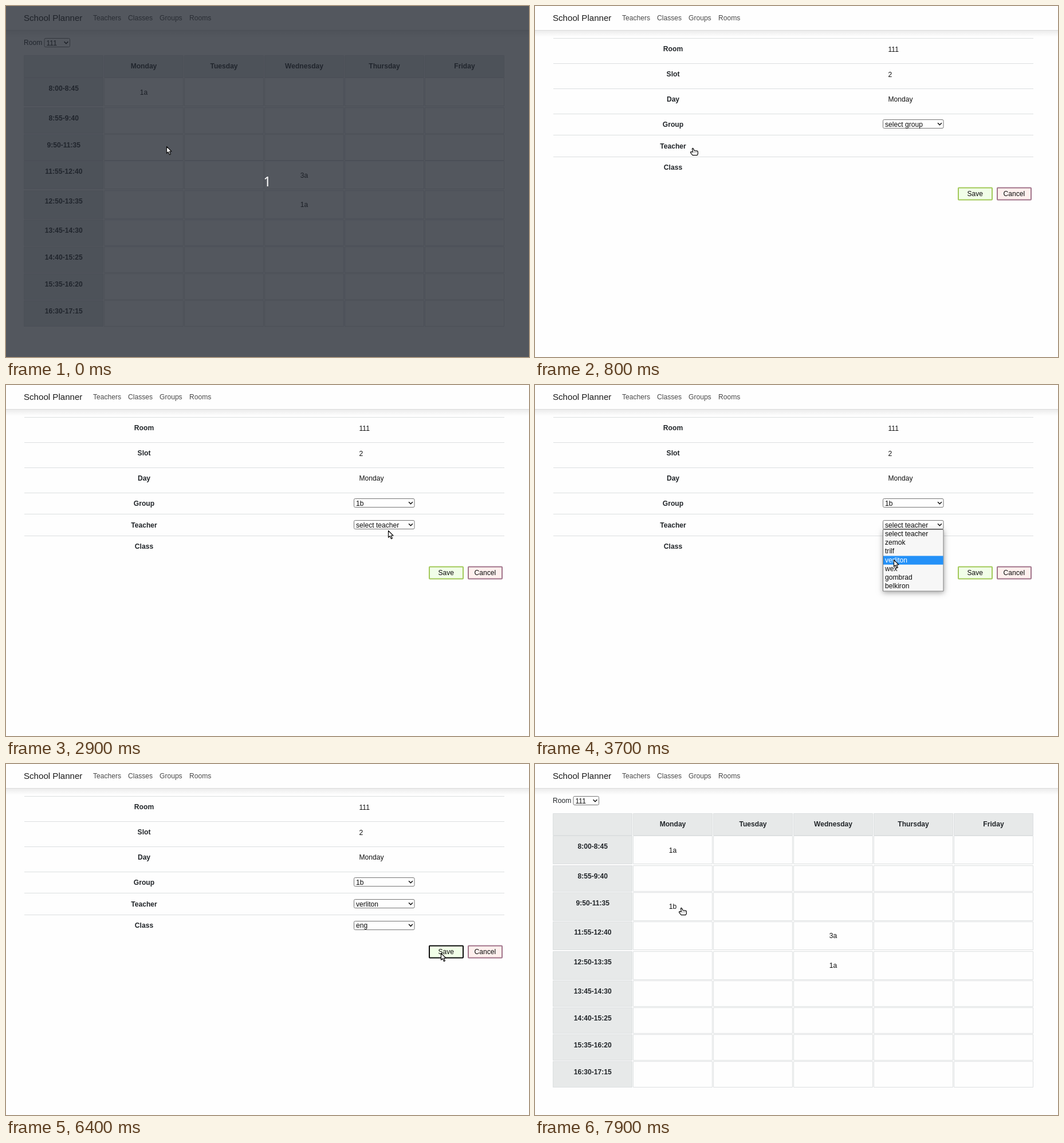
These frames come from a looping animation (913x613 px, 8000 ms). An HTML page with a canvas:

```html
<!DOCTYPE html>
<html lang="en">
<head>
<meta charset="utf-8">
<title>School Planner</title>
<style>
html, body { margin: 0; width: 100%; height: 100%; overflow: hidden; background: #fefefe; }
canvas { display: block; }
</style>
</head>
<body>
<canvas id="stage" width="913" height="613"></canvas>
<script>
const ctx = document.getElementById('stage').getContext('2d');
const LOOP = 8000, TICK = 100;
const SANS = '"Liberation Sans", Arial, sans-serif';
const INK = '#212529', LINE = '#dcdfe0', OPTION_H = 15.22;

const DAYS = ['Monday', 'Tuesday', 'Wednesday', 'Thursday', 'Friday'];
const SLOTS = ['8:00-8:45', '8:55-9:40', '9:50-11:35', '11:55-12:40', '12:50-13:35',
  '13:45-14:30', '14:40-15:25', '15:35-16:20', '16:30-17:15'];

// Each field: when it shows, opens and closes, and the option chosen.
const FIELDS = [
  { label: 'Group', y: 198, show: 700, open: 1900, close: 2700, pick: 2, lead: 0,
    options: ['select group', '1a', '1b', '1c', '2a', '2b', '3a', '3b', '4a', '4b'] },
  { label: 'Teacher', y: 236, show: 2900, open: 3200, close: 4000, pick: 3, lead: 0,
    options: ['select teacher', 'zemok', 'trilf', 'verliton', 'wex', 'gombrad', 'belkiron'] },
  { label: 'Class', y: 273.6, show: 4200, open: 4600, close: 5700, pick: 3, lead: 200,
    options: ['select class', 'mat', 'geo', 'eng', 'phys', 'biol'] }
];

// Pointer moves: first step, last step, end x, end y.
const MOVES = [
  [100, 100, 281, 245], [400, 400, 279, 245.5], [700, 700, 276, 248], [1000, 1000, 275, 248],
  [1300, 1400, 709, 222], [1600, 2000, 697, 205], [2200, 2400, 667, 252], [2500, 2500, 665, 252],
  [2900, 2900, 667, 254], [3100, 3200, 702, 242], [3400, 3700, 626, 305], [4100, 4300, 690, 283],
  [4500, 4600, 685, 281], [4800, 5100, 633, 324], [5300, 5300, 629, 343], [5500, 5500, 628, 343],
  [5800, 6000, 815, 330], [6100, 6100, 765, 329], [6300, 6300, 759, 330], [6600, 6600, 762, 330],
  [7500, 7700, 186, 240], [7800, 7900, 256, 251]
];

function pointerAt(t) {
  let x = 280, y = 245;
  for (const [start, end, toX, toY] of MOVES) {
    if (t < start) break;
    const p = Math.min(1, (t - start + TICK) / (end - start + TICK));
    x += (toX - x) * p;
    y += (toY - y) * p;
  }
  return { x, y };
}

// y is the middle of the capitals.
function text(s, x, y, { color = INK, size = 12.1, bold = false, align = 'left', font = SANS } = {}) {
  ctx.font = `${bold ? 'bold ' : ''}${size}px ${font}`;
  ctx.textAlign = align;
  ctx.fillStyle = color;
  ctx.fillText(s, x, Math.round(y + size * 0.36));
}

function rect(x, y, w, h, fill) {
  ctx.fillStyle = fill;
  ctx.fillRect(x, y, w, h);
}

function box(x, y, w, h, fill, stroke, line = 1, radius = 0) {
  ctx.beginPath();
  ctx.roundRect(x, y, w, h, radius);
  ctx.fillStyle = fill;
  ctx.fill();
  ctx.strokeStyle = stroke;
  ctx.lineWidth = line;
  ctx.stroke();
}

function drawNav() {
  rect(0, 0, 913, 42, '#fefefe');
  rect(0, 42, 913, 1, '#dadada');
  const fade = ctx.createLinearGradient(0, 43, 0, 54);
  fade.addColorStop(0, 'rgba(0,0,0,.07)');
  fade.addColorStop(1, 'rgba(0,0,0,0)');
  rect(0, 43, 913, 11, fade);
  text('School Planner', 31, 21, { size: 15.1, color: '#1b1b1b' });
  [['Teachers', 152], ['Classes', 213], ['Groups', 268], ['Rooms', 320]]
    .forEach(([s, x]) => text(s, x, 20.6, { color: '#4a4a4a' }));
}

function drawSelect(x, y, w, value) {
  box(x + 0.5, Math.round(y) + 0.5, w - 1, 15, '#fefefe', '#767676', 1, 2);
  text(value, x + 4, y + 8.2, { color: '#0c0c0c' });
  const cx = x + w - 7, cy = y + 8;
  ctx.beginPath();
  ctx.moveTo(cx - 3.4, cy - 1.8);
  ctx.lineTo(cx, cy + 1.7);
  ctx.lineTo(cx + 3.4, cy - 1.8);
  ctx.strokeStyle = '#111';
  ctx.lineWidth = 1.6;
  ctx.stroke();
}

function drawTable(saved) {
  text('Room', 31, 63.8);
  drawSelect(66.5, 56, 45.5, '111');
  const lessons = { '0,0': '1a', '3,2': '3a', '4,2': '1a' };
  if (saved) lessons['2,0'] = '1b';
  const colX = i => 31.5 + 140 * i;
  const cell = (i, y, h, head) => box(colX(i), y, 138, h, head ? '#e7e9e9' : '#fefefe', LINE);

  for (let i = 0; i < 6; i++) {
    cell(i, 86.5, 38, true);
    if (i) text(DAYS[i - 1], colX(i) + 69, 104.6, { bold: true, align: 'center' });
  }
  let top = 125.3;
  SLOTS.forEach((slot, row) => {
    const filled = DAYS.some((_, d) => lessons[[row, d]]);
    const pitch = filled ? 51.5 : 46.8;
    const y = Math.round(top) + 0.5;
    const h = Math.round(pitch - 2.3);
    for (let i = 0; i < 6; i++) {
      cell(i, y, h, i === 0);
      const lesson = lessons[[row, i - 1]];
      if (lesson) text(lesson, colX(i) + 69, top + 25, { align: 'center', color: '#111' });
    }
    text(slot, 100.8, top + 18.7, { bold: true, align: 'center' });
    top += pitch;
  });
}

function drawOptions(field, t) {
  const top = Math.round(field.y + 16), n = field.options.length;
  const h = n * OPTION_H + 1;
  ctx.save();
  ctx.shadowColor = 'rgba(0,0,0,.35)';
  ctx.shadowBlur = 9;
  ctx.shadowOffsetY = 2;
  rect(607, top, 106.5, h + 1, '#f7f7f7');
  ctx.restore();
  const over = Math.floor((pointerAt(t + field.lead).y - top - 0.5) / OPTION_H);
  const active = Math.max(0, Math.min(n - 1, over));
  box(607.5, top + 0.5, 105.5, h, '#f7f7f7', '#777');
  rect(608, top + 0.8 + active * OPTION_H, 104.6, OPTION_H, '#2491f8');
  field.options.forEach((s, i) =>
    text(s, 611, top + 7.6 + i * OPTION_H, { color: i === active ? '#fff' : '#0c0c0c' }));
}

function drawButton(x, label, fill, stroke) {
  box(x + 1, 317.5, 59, 21, fill, stroke, 2, 1);
  text(label, x + 30.3, 328, { align: 'center', color: '#0c0c0c' });
}

function drawForm(t) {
  [56, 100, 144, 188, 225, 263].forEach(y => rect(32, y, 838, 1, LINE));
  [['Room', '111'], ['Slot', '2'], ['Day', 'Monday']].forEach(([label, value], i) => {
    text(label, 241, 74.5 + 43.85 * i, { bold: true, align: 'center' });
    text(value, 616.5, 75.3 + 43.85 * i, { color: '#111' });
  });
  drawButton(738, 'Save', '#f1fee8', t >= 6400 ? '#0c0c0c' : '#a3c95b');
  drawButton(806, 'Cancel', '#fef0ee', '#a2758b');
  for (const f of FIELDS) {
    text(f.label, 241, f.y + 8.2, { bold: true, align: 'center' });
    if (t >= f.show) drawSelect(607, f.y, 106.5, f.options[t >= f.close ? f.pick : 0]);
  }
  const open = FIELDS.find(f => t >= f.open && t < f.close);
  if (open) drawOptions(open, t);
}

const ARROW = new Path2D('M.5 .5V12.2L3.2 9.8L5.4 14.6L7.4 13.7L5.3 9H9Z');
const HAND = new Path2D('M-1.6 1.2Q-1.2 0 0 .6L2.2 4.6L7 5.2Q8.4 5.6 8.4 7V10.2L7 12.6H-.8' +
  'L-4.2 8.6Q-5 6.8-3.4 6.6L-.6 7.2Z');

function drawPointer(t) {
  const { x, y } = pointerAt(t);
  const hand = (t >= 100 && t < 1000) || t >= 6600;
  const shape = hand ? HAND : ARROW;
  ctx.save();
  ctx.translate(x, y);
  ctx.lineJoin = 'round';
  ctx.fillStyle = '#fff';
  ctx.strokeStyle = '#0a0a0a';
  ctx.lineWidth = 1.2;
  ctx.fill(shape);
  ctx.stroke(shape);
  if (hand) [1.2, 3.4, 5.6].forEach(k => rect(k, 6.6, 0.8, 1.6, '#555'));
  ctx.restore();
}

function drawCountdown() {
  rect(0, 0, 913, 613, 'rgba(32,37,46,.77)');
  text('1', 456, 306.5, { size: 23, color: '#fff', align: 'center', font: '"Noto Sans", sans-serif' });
}

function draw(now) {
  const t = Math.floor((now % LOOP) / TICK) * TICK;
  rect(0, 0, 913, 613, '#fefefe');
  drawNav();
  if (t >= 700 && t < 6600) drawForm(t);
  else drawTable(t >= 6600);
  if (t < 100) drawCountdown();
  drawPointer(t);
}

const began = performance.now();
function loop() {
  draw(performance.now() - began);
  requestAnimationFrame(loop);
}
loop();
</script>
</body>
</html>
```
